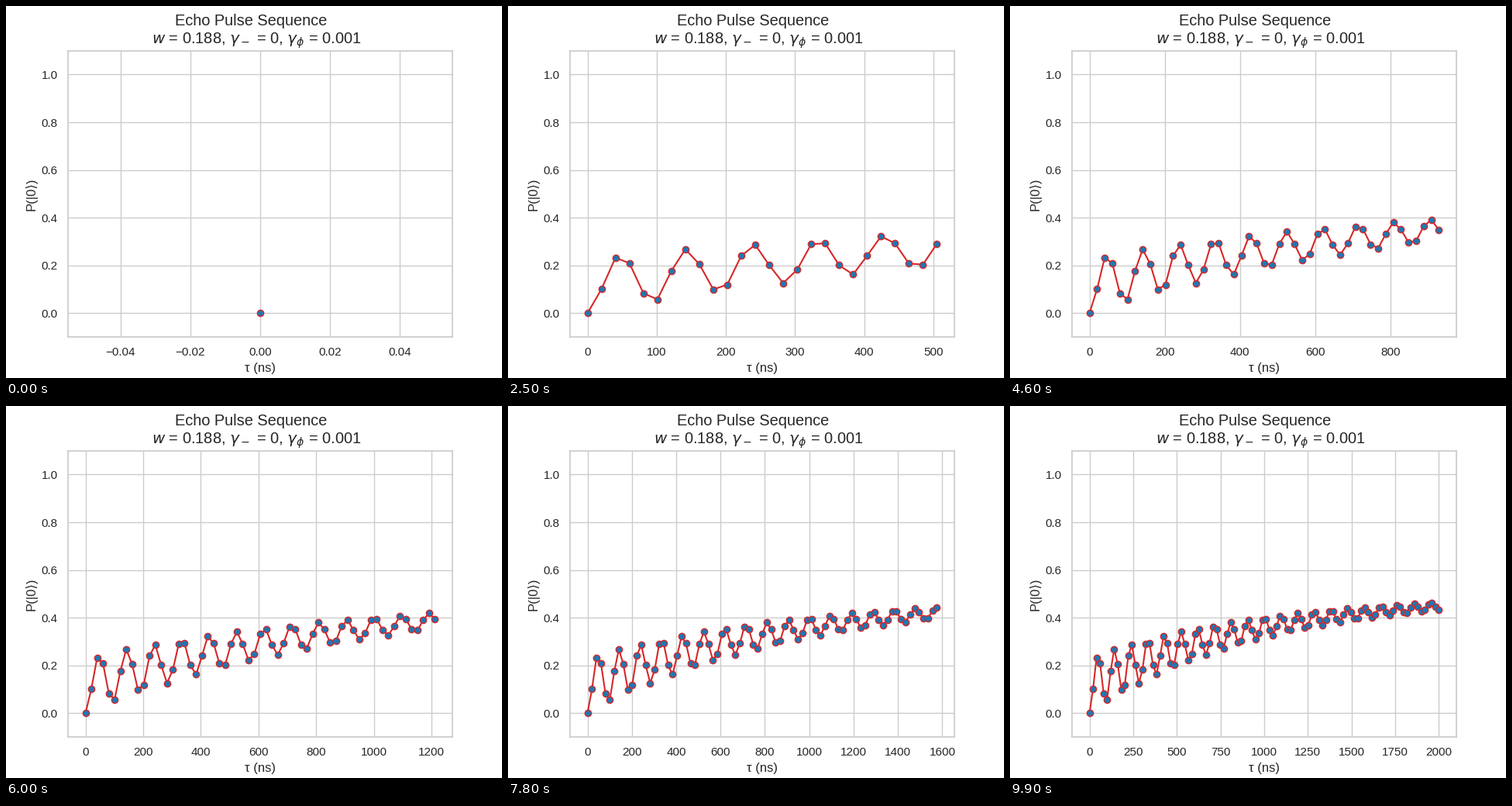
A matplotlib script that plays this animation: 640x480 px, repeating every 10000 ms.

```python
import numpy as np
import matplotlib.pyplot as plt
from matplotlib.animation import FuncAnimation

INK, GRID = "0.15", "0.8"
N = 100
GAMMA = 0.001
OMEGA = 0.0659

plt.rcParams.update({
    "font.family": ["Liberation Sans", "DejaVu Sans"],
    "text.color": INK,
    "axes.labelcolor": INK,
    "axes.labelsize": 12,
    "axes.edgecolor": GRID,
    "axes.linewidth": 1.25,
    "axes.grid": True,
    "axes.axisbelow": True,
    "grid.color": GRID,
    "grid.linewidth": 1,
    "lines.solid_capstyle": "round",
})
for axis, side in (("xtick", "bottom"), ("ytick", "left")):
    plt.rcParams.update({
        f"{axis}.{side}": False,
        f"{axis}.major.size": 6,
        f"{axis}.labelsize": 11,
        f"{axis}.color": INK,
    })


def echo(t):
    """Damped echo signal relaxing towards one half."""
    swing = 0.1155 * np.cos(OMEGA * t) - 0.0025 * np.sin(OMEGA * t)
    return 0.5 - np.exp(-GAMMA * t) * (0.3825 + swing)


tau = np.linspace(0, 2000, N)
prob = echo(tau)
prob[0] = 0

fig, ax = plt.subplots(figsize=(6.4, 4.8), dpi=100)


def heading(x, y, text):
    fig.text(x / 640, 1 - y / 480, text, fontsize=14.4,
             ha="left", va="baseline")


heading(218, 25, "Echo Pulse Sequence")
heading(188, 49, r"$w$ = 0.188, $\gamma_-$ = 0, $\gamma_\phi$ = 0.001")
ax.set_xlabel("τ (ns)")
ax.set_ylabel("P(|0⟩)")
ax.set_ylim(-0.1, 1.1)

line, = ax.plot([], [], "o-", color="tab:red", lw=1.5, ms=6,
                markerfacecolor="tab:blue", markeredgecolor="tab:red",
                markeredgewidth=1)


def update(i):
    line.set_data(tau[:i + 1], prob[:i + 1])
    end = tau[i]
    if i:
        ax.set_xlim(-0.05 * end, 1.05 * end)
    else:
        ax.set_xlim(-0.055, 0.055)
    return line,


anim = FuncAnimation(fig, update, frames=N, interval=100,
                     repeat=True, repeat_delay=0, blit=False)
plt.show()
```
